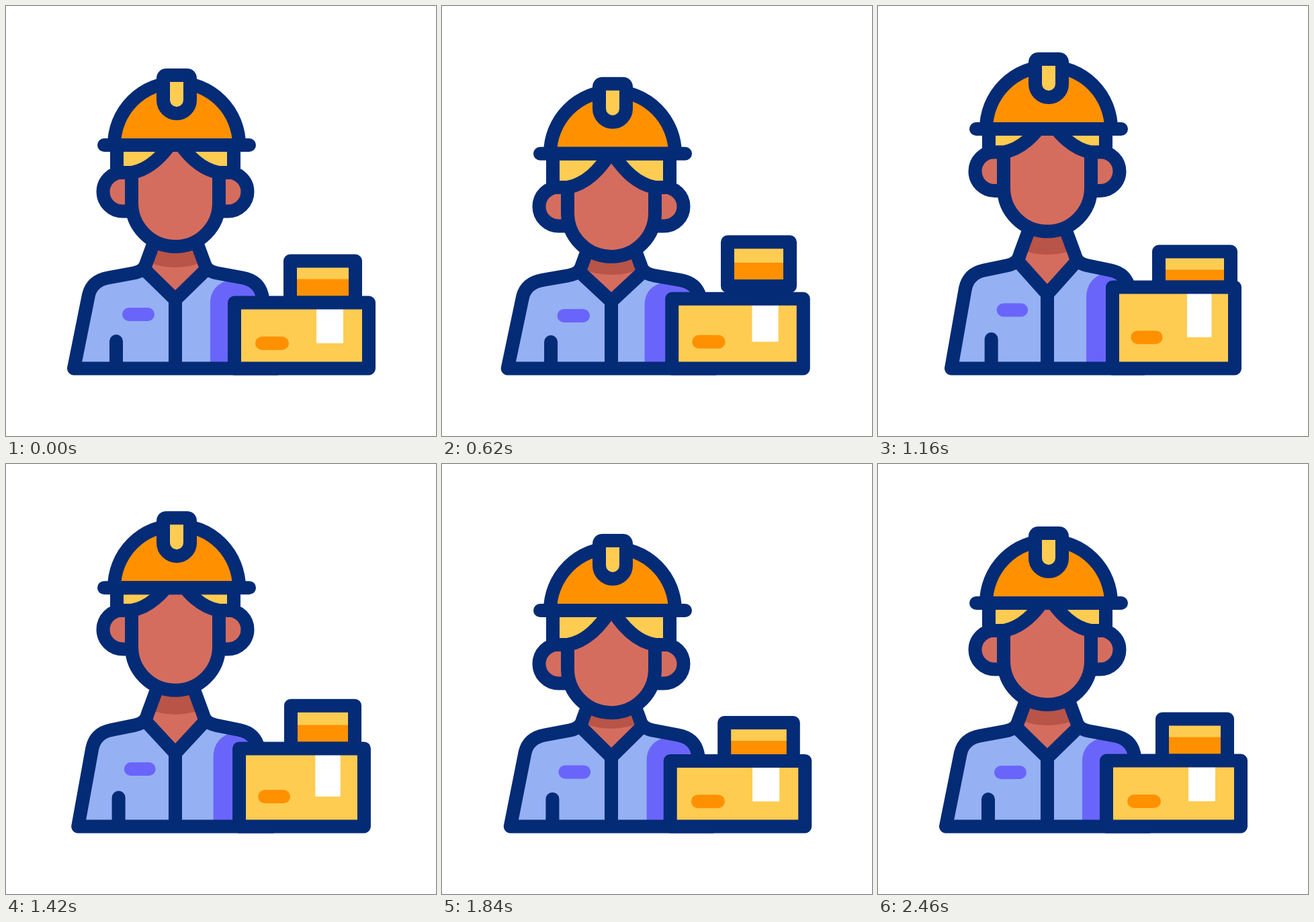
These frames come from a looping animation (640 px wide and 640 px high, 2840 ms). An HTML page:

```html
<!DOCTYPE html>
<html lang="en">
<head>
<meta charset="utf-8">
<title>Worker with boxes</title>
<style>
  html, body { margin: 0; width: 100%; height: 100%; overflow: hidden; background: #fff; }
  svg { display: block; width: 100%; height: 100%; }
  .line { fill: none; stroke: #042b76; stroke-width: 20; stroke-linecap: round; stroke-linejoin: round; }
  .butt { stroke-linecap: butt; }
  .pill { fill: none; stroke-width: 20; stroke-linecap: round; }
  .skin { fill: #d56d5e; }
  .shade { fill: #b85448; }
  .shirt { fill: #95b0f3; }
  .fold { fill: #6a65fa; }
  .orange { fill: #ff9100; }
  .yellow { fill: #ffcc52; }
</style>
</head>
<body>
<svg viewBox="0 0 640 640">
  <defs>
    <clipPath id="neckClip"><path id="neckShape"/></clipPath>
  </defs>

  <path id="shirt" class="shirt"/>
  <path id="fold" class="fold"/>
  <path id="neck" class="skin"/>
  <g clip-path="url(#neckClip)"><path id="shade" class="shade"/></g>
  <path id="pocket" class="pill" stroke="#6a65fa"/>
  <path id="bodyLine" class="line"/>

  <g id="ears">
    <path class="line butt skin" d="M190 247.5H173.5A29 29 0 0 0 173.5 305.5H190M314 247.5H330.5A29 29 0 0 1 330.5 305.5H314"/>
  </g>
  <g id="face">
    <path class="skin" d="M187 195V293A65 65 0 0 0 317 293V195Z"/>
    <path class="line butt" d="M187 237V293A65 65 0 0 0 317 293V237"/>
  </g>
  <g id="hair">
    <path class="yellow" d="M165 190H339V248H317C292 244 269 223 252 194C235 223 212 244 187 248H165Z"/>
    <path class="line butt" d="M165 190V248H187C212 244 235 223 252 194C269 223 292 244 317 248H339V190"/>
  </g>
  <g id="hat">
    <path class="line orange" d="M161 207A93 93 0 0 1 347 207Z"/>
    <path class="line" d="M146 207H362"/>
    <path class="line yellow" d="M234 108Q234 103 239 103H269Q274 103 274 108V140A20 20 0 0 1 234 140Z"/>
  </g>

  <path id="parcelTop" class="yellow"/>
  <path id="parcelLow" class="orange"/>
  <path id="parcelLine" class="line"/>
  <path id="crate" class="yellow"/>
  <path id="label" fill="#fff" stroke="#fff" stroke-width="2" stroke-linejoin="round"/>
  <path id="slot" class="pill" stroke="#ff9100"/>
  <path id="crateLine" class="line"/>
</svg>
<script>
const LOOP = 2840, FLOOR = 539.5;
const el = {};
document.querySelectorAll('svg [id]').forEach(n => { el[n.id] = n; });

// Cosine easing from pose to pose; 1 is fully stretched, -1 fully squashed.
const poses = (...keys) => t => {
  const i = keys.findIndex(k => k[0] > t);
  if (i <= 0) return 0;
  const [t0, a] = keys[i - 1], [t1, b] = keys[i];
  return a + (b - a) * (1 - Math.cos(Math.PI * (t - t0) / (t1 - t0))) / 2;
};

const bodyPose = poses([220, 0], [460, -1], [840, 1], [1330, 1], [1730, -.85], [1960, 1.15], [2270, -.25], [2370, 0]);
const cratePose = poses([220, 0], [430, -1], [760, 1], [1340, 1], [1720, -1], [1960, .9], [2290, -.25], [2380, 0]);
const parcelPose = poses([220, 0], [460, -.6], [620, .4], [1000, .4], [1160, -1], [1400, .2], [1800, -.6], [2160, .6], [2400, 0]);

// A pose scaled separately for its stretched and squashed side.
const gain = (pose, up, down) => pose * (pose > 0 ? up : down);

const hop = (t, from, to, height) => {
  const u = (t - from) / (to - from);
  return Math.max(0, 4 * u * (1 - u) * height);
};

const set = (id, d) => el[id].setAttribute('d', d);
const shift = (id, y) => el[id].setAttribute('transform', `translate(0 ${y.toFixed(2)})`);
const rect = (l, t, r, b) => `M${l} ${t}H${r}V${b}H${l}Z`;

// Point mapper that squashes about a centre on the floor.
const squash = (cx, sx, sy) => (x, y) =>
  `${(cx + (x - cx) * sx).toFixed(2)} ${(FLOOR + (y - FLOOR) * sy).toFixed(2)} `;

function drawBody(t, faceY) {
  const pose = bodyPose(t);
  const sx = 1 - gain(pose, .053, .093), sy = 1 + gain(pose, .081, .105);
  const p = squash(252, sx, sy);
  const q = (x, y) => p(504 - x, y);

  const side = f => `${f(101, FLOOR)}L${f(123, 430)}Q${f(128, 409)}${f(152, 404.5)}`
    + `L${f(190, 397.5)}C${f(202, 395)}${f(207, 390)}${f(209, 382)}`;
  const rightEdge = f => `L${f(152, 404.5)}Q${f(128, 409)}${f(123, 430)}L${f(101, FLOOR)}Z`;

  // The neck keeps its slope while its top follows the head.
  const neckY = 340 + faceY;
  const [baseX, baseY] = p(209, 382).split(' ').map(Number);
  const neckX = baseX + (baseY - neckY) * .37;
  const neckL = `${neckX} ${neckY}`, neckR = `${504 - neckX} ${neckY}`;
  const neck = `M${neckL}L${p(209, 382)}L${p(210, 395)}L${p(252, 437)}L${q(210, 395)}L${q(209, 382)}L${neckR}Z`;

  set('shirt', `M${side(p)}L${q(209, 382)}L${q(190, 397.5)}${rightEdge(q)}`);
  const edge = 304 + gain(pose, 6, 10);
  const foldY = y => FLOOR + (y - FLOOR) * sy;
  set('fold', `M${edge} ${FLOOR}V${foldY(442)}Q${edge} ${foldY(415)} ${edge + 30} ${foldY(407)}${rightEdge(q)}`);
  set('neck', neck);
  set('neckShape', neck);
  const s = -gain(bodyPose(t - 20), 19, 28);
  set('shade', `M200 ${300 + s}V${377 + s}Q252 ${401 + s} 304 ${377 + s}V${300 + s}Z`);
  set('pocket', `M${p(183, 459)}L${p(211, 459)}`);
  set('bodyLine', `M${side(p)}L${neckL}M${side(q)}L${neckR}M${p(101, FLOOR)}L${q(101, FLOOR)}`
    + `M${p(210, 396)}L${p(252, 437)}L${q(210, 396)}M${p(252, 437)}L${p(252, FLOOR)}`
    + `M${p(164, 499)}L${p(164, FLOOR)}`);
}

function drawBoxes(t) {
  const pose = cratePose(t);
  const sy = 1 + gain(pose, .235, .12);
  const p = squash(440, 1 - gain(pose, .09, .075), sy);
  const box = (l, top, r, b) => `M${p(l, top)}L${p(r, top)}L${p(r, b)}L${p(l, b)}Z`;
  set('crate', box(340, 441.5, 540, FLOOR));
  set('crateLine', box(340, 441.5, 540, FLOOR));
  set('label', box(463, 441.5, 501, 501));
  set('slot', `M${p(381, 502)}L${p(411, 502)}`);

  const stretch = parcelPose(t);
  const half = 48.5 - 5 * stretch, height = 62 + 9 * stretch;
  const bottom = FLOOR - 98 * sy - hop(t, 520, 1080, 32) - hop(t, 1860, 2140, 16);
  const top = bottom - height;
  const split = top + 27 + Math.max(0, height - 62);
  const l = 471.5 - half, r = 471.5 + half;
  set('parcelTop', rect(l, top, r, split + 1));
  set('parcelLow', rect(l, split, r, bottom));
  set('parcelLine', rect(l, top, r, bottom));
}

function render(t) {
  // Each part of the head trails the body a little.
  const faceY = -gain(bodyPose(t - 45), 22.5, 26);
  const earY = -gain(bodyPose(t - 70), 30.5, 30);
  drawBody(t, faceY);
  shift('face', faceY);
  shift('ears', earY);
  shift('hair', earY);
  shift('hat', -gain(bodyPose(t - 50), 24, 21));
  drawBoxes(t);
}

const start = performance.now();
function tick() {
  render((performance.now() - start) % LOOP);
  requestAnimationFrame(tick);
}
tick();
</script>
</body>
</html>
```
